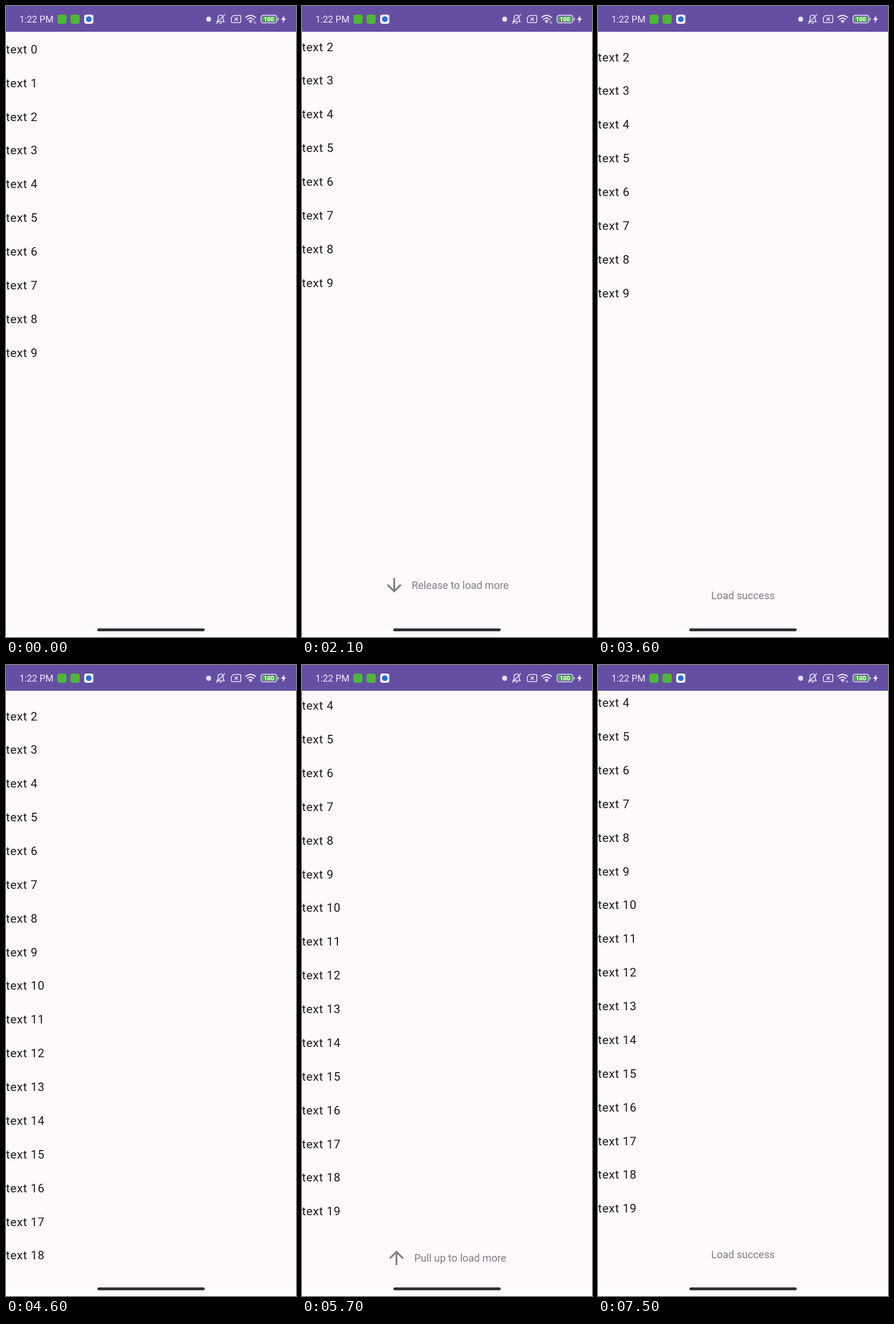
Animation of 508 by 1102 pixels, one loop 8 s. Source, as an HTML page:

```html
<!DOCTYPE html>
<html lang="en">
<head>
<meta charset="utf-8">
<title>Pull up to load</title>
<style>
html, body { margin: 0; width: 100%; height: 100%; overflow: hidden; background: #fffcff; }
#stage { position: relative; width: 508px; height: 1102px; overflow: hidden; font-family: Roboto, sans-serif; }
#bar { position: absolute; left: 0; top: 0; }
#view { position: absolute; left: 0; top: 45px; width: 508px; height: 1036.5px; overflow: hidden; background: #fff9fe; }
#list { position: absolute; left: 0; top: 1.9px; color: #1b191d; font-size: 20.7px; letter-spacing: .65px; }
#list div { height: 58.86px; line-height: 58.86px; white-space: nowrap; }
#foot {
  position: absolute; left: 0; top: 0; width: 508px; height: 103.7px;
  display: flex; align-items: center; justify-content: center; gap: 15.5px;
  color: #7f7d81; font-size: 18.14px; white-space: nowrap;
}
#foot svg { width: 31px; height: 31px; overflow: visible; }
#home { position: absolute; left: 160px; top: 1087px; width: 188px; height: 5px; border-radius: 3px; background: #323034; }
</style>
</head>
<body>
<div id="stage">
  <div id="view">
    <div id="list"></div>
    <div id="foot">
      <svg id="arrow" viewBox="2.3 2.3 19.4 19.4"><path fill="#808080" d="M20 12l-1.41-1.41L13 16.17V4h-2v12.17l-5.58-5.59L4 12l8 8z"/></svg>
      <svg id="spin" viewBox="0 0 31 31"><circle cx="15.5" cy="15.5" r="14.2" pathLength="360" fill="none" stroke="#7f7d81" stroke-width="2.6"/></svg>
      <span id="label"></span>
    </div>
  </div>
  <svg id="bar" width="508" height="45" fill="none" stroke="#e6e0f3" stroke-width="1.6" stroke-linecap="round" stroke-linejoin="round">
    <path d="M0 0H508V45H0z" fill="#654fa3" stroke="none"/>
    <g stroke="none">
      <text x="23.5" y="28.8" font-family="Roboto, sans-serif" font-size="16.2" fill="#f0ecf8">1:22 PM</text>
      <rect x="90" y="15" width="16" height="16" rx="4" fill="#4cb932"/>
      <rect x="113" y="15" width="16" height="16" rx="4" fill="#4cb932"/>
      <rect x="137" y="15" width="16" height="16" rx="4" fill="#fff"/>
      <circle cx="145" cy="23" r="5" fill="#1f6fe0"/>
      <circle cx="355" cy="23" r="4.5" fill="#e6e0f3"/>
    </g>
    <path d="M369.5 27.5H382.5L380.5 24.5V21C380.5 17.5 378.5 15.7 376 15.7S371.5 17.5 371.5 21V24.5zM374.5 30H377.5M383 15L368.8 30.5"/>
    <path d="M398.5 16.5H409.5Q411.3 16.5 411.3 18.3V27.3Q411.3 29 409.5 29H396.3Q394.7 29 394.7 27.3V20.3zM401 20.6L405.6 25.2M405.6 20.6L401 25.2"/>
    <path stroke-width="2.1" d="M420 19.8Q428.5 12.8 437 19.8M423 23.3Q428.5 18.8 434 23.3M426 26.5Q428.5 24.6 431 26.5"/>
    <circle cx="428.5" cy="28.6" r="1.5" fill="#e6e0f3" stroke="none"/>
    <path id="data" stroke-width="1.1" d="M434.7 27V30M437 27.8V30.6"/>
    <rect x="446.8" y="16.3" width="27.6" height="13.2" rx="3.6"/>
    <rect x="448.8" y="18.3" width="23.6" height="9.2" rx="1.8" fill="#4fae45" stroke="none"/>
    <path d="M477 21.5V24.5"/>
    <text x="460.6" y="26.9" text-anchor="middle" font-family="Roboto, sans-serif" font-size="10.5" font-weight="700" fill="#fff" stroke="none">100</text>
    <path d="M487.6 16.2L481.8 24H485.3L484.4 29.8L490.4 21.8H486.8z" fill="#f0ecf8" stroke="none"/>
  </svg>
  <div id="home"></div>
</div>
<script>
const LOOP = 8000, STEP = 100;
const FOOT = 103.7;      // footer height, also the release threshold
const LONG_END = 141.7;  // scroll limit of the extended list
const GROW = 4600;       // when the second page of rows arrives
const SPIN = 1332;

const $ = id => document.getElementById(id);
const list = $('list'), foot = $('foot'), arrow = $('arrow'), label = $('label');
const ring = $('spin').firstElementChild;

for (let i = 0; i < 20; i++) {
  const row = document.createElement('div');
  row.textContent = 'text ' + i;
  list.append(row);
}
const extra = [...list.children].slice(10);

const clamp = (v, a = 0, b = 1) => Math.min(b, Math.max(a, v));
const mix = (a, b, k) => a + (b - a) * k;
const show = (el, on) => { el.style.display = on ? '' : 'none'; };

// finger drag: quick start, long tail
function drag(t, start, end) {
  if (t >= end) return 1;
  const n = Math.max(0, t - start) / STEP;
  return 1 - Math.exp(-Math.pow(n * .369, 1.6));
}

const settle = (t, start) => 1 - (1 - clamp((t - start) / 300)) ** 2;

function scrollAt(t) {
  if (t < 2500) return mix(0, 121.7, drag(t, 1000, 1700));
  if (t < 5400) return mix(121.7, FOOT, settle(t, 2400));
  if (t < 6400) return mix(FOOT, 264.9, drag(t, 5300, 6100));
  return mix(264.9, LONG_END + FOOT, settle(t, 6300));
}

// cubic-bezier(.4, 0, .2, 1)
function ease(x) {
  let lo = 0, hi = 1, u = .5;
  for (let i = 0; i < 20; i++) {
    u = (lo + hi) / 2;
    const bx = 1.2 * u * (1 - u) ** 2 + .6 * u * u * (1 - u) + u ** 3;
    if (bx < x) lo = u; else hi = u;
  }
  return u * u * (3 - 2 * u);
}

function spinAt(t) {
  const p = t % SPIN / SPIN, turn = Math.floor(t / SPIN) * 216;
  const head = 290 * ease(clamp(p * 2)), tail = 290 * ease(clamp(p * 2 - 1));
  const sweep = head - tail + 10;
  ring.setAttribute('stroke-dasharray', sweep + ' ' + (360 - sweep));
  ring.setAttribute('transform', `rotate(${turn + 286 * p + tail - 95} 15.5 15.5)`);
}

function draw(time) {
  const t = Math.floor(time % LOOP / STEP) * STEP;
  const s = scrollAt(t);
  const grown = t >= GROW;
  const over = s - (grown ? LONG_END : 0);
  const phase = grown ? t - 6400 : t - 2500;
  const loading = phase >= 0 && phase < 900;
  const done = phase >= 900;
  const ready = over >= FOOT;

  list.style.transform = `translateY(${-s}px)`;
  foot.style.transform = `translateY(${1037 - over}px)`;
  extra.forEach(row => show(row, grown));
  show(arrow, !loading && !done);
  show($('spin'), loading);
  show($('data'), t < 3400 || t >= 7300);
  arrow.style.transform = ready ? '' : 'rotate(180deg)';
  label.textContent = loading ? 'Loading…' : done ? 'Load success'
    : ready ? 'Release to load more' : 'Pull up to load more';
  if (loading) spinAt(phase + 50);
}

const begin = performance.now();
function tick() {
  draw(performance.now() - begin);
  requestAnimationFrame(tick);
}
tick();
</script>
</body>
</html>
```
